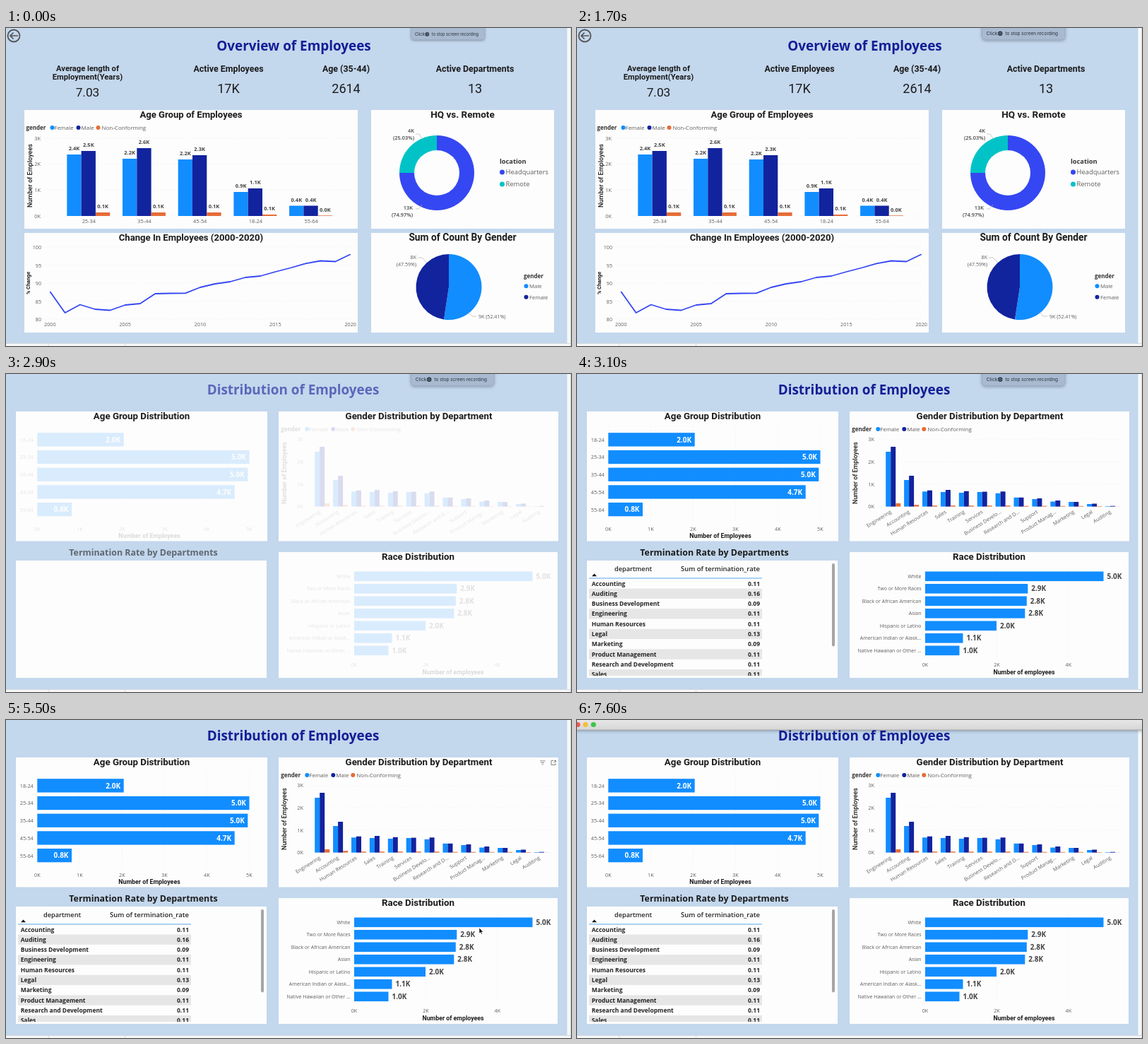
An HTML page for the animation above (7.7 s loop, 800 by 450 pixels).

```html
<!DOCTYPE html>
<html lang="en">
<head>
<meta charset="utf-8">
<title>Employee dashboard</title>
<style>
  html, body { margin: 0; width: 100%; height: 100%; overflow: hidden; background: #c3d7ed; }
  svg { display: block; width: 800px; height: 450px; }
  text { font-family: "Open Sans", "Noto Sans", sans-serif; }
  .din { font-family: Roboto, sans-serif; }
  .ui { font-family: Inter, sans-serif; }
</style>
</head>
<body>
<svg id="stage" viewBox="0 0 800 450"></svg>
<script>
const LOOP = 7700;
const FEMALE = '#118dff', MALE = '#12239e', OTHER = '#e66c37', BLUE = '#3547f2', TEAL = '#01c3c7';
const INK = '#1c1c1c', GREY = '#605e5c';

// Drawing helpers; each returns SVG markup.
const rect = (x, y, w, h, fill, extra = '') =>
  `<rect x="${x}" y="${y}" width="${w}" height="${h}" fill="${fill}" ${extra}/>`;
const dot = (x, y, r, fill, extra = '') => `<circle cx="${x}" cy="${y}" r="${r}" fill="${fill}" ${extra}/>`;
const path = (d, stroke, width = 1, extra = '') =>
  `<path d="${d}" fill="none" stroke="${stroke}" stroke-width="${width}" ${extra}/>`;
const text = (s, x, y, size, { anchor = 'start', weight = 400, fill = GREY, cls = '', turn = 0 } = {}) =>
  `<text x="${x}" y="${y}" font-size="${size}" font-weight="${weight}" fill="${fill}" text-anchor="${anchor}"
    class="${cls}" ${turn ? `transform="rotate(${turn} ${x} ${y})"` : ''}>${s}</text>`;
const end = { anchor: 'end' }, mid = { anchor: 'middle' };
const heading = (s, x, y, size = 13.3, weight = 700, turn = 0) =>
  text(s, x, y, size, { anchor: 'middle', weight, fill: INK, cls: 'din', turn });
const title = (s, x, y) => text(s, x, y, 18.9, { anchor: 'middle', weight: 700, fill: '#141e96' });
const panel = (x, y, right, bottom) => rect(x, y, right - x, bottom - y, '#fdfdfd');
const grid = d => path(d, '#dedede', .6, 'stroke-dasharray="1 3"');
const each = (list, fn) => list.map(fn).join('');
const group = (id, content, extra = '') => `<g id="${id}" ${extra}>${content}</g>`;

function genderLegend(x, y) {
  return text('gender', x, y, 8, { weight: 700, fill: '#333' }) +
    each([['Female', 37, 40, FEMALE], ['Male', 74, 78, MALE], ['Non-Conforming', 102, 107, OTHER]],
      ([name, cx, tx, fill]) => dot(x + cx, y - 3, 3, fill) + text(name, x + tx, y, 8));
}

function sector(cx, cy, r, from, to, fill) {
  const at = part => {
    const a = part * 2 * Math.PI;
    return `${cx + r * Math.sin(a)} ${cy - r * Math.cos(a)}`;
  };
  return `<path d="M${cx} ${cy}L${at(from)}A${r} ${r} 0 ${to - from > .5 ? 1 : 0} 1 ${at(to)}Z" fill="${fill}"/>`;
}

function ageColumns() {
  const base = 266;
  const groups = [
    ['25-34', [179, 174, 261], ['2.4K', '2.5K', '0.1K']],
    ['35-44', [185, 170, 261], ['2.2K', '2.6K', '0.1K']],
    ['45-54', [186, 180, 261], ['2.2K', '2.3K', '0.1K']],
    ['18-24', [232, 227, 264], ['0.9K', '1.1K', '0.1K']],
    ['55-64', [251.5, 251.5, 265.3], ['0.4K', '0.4K', '0.0K']]];
  return each([0, 1, 2, 3], k => {
    const y = base - 36.7 * k;
    return grid(`M55 ${y}H490`) + text(k + 'K', 49, y + 2.6, 7.3, end);
  }) + each(groups, ([name, tops, labels], i) => {
    const x = 86.3 + 78.7 * i;
    return each(tops, (top, j) =>
      rect(x + 20.3 * j, top, 20.3, base - top, [FEMALE, MALE, OTHER][j]) +
      text(labels[j], x + 10.2 + 20.3 * j, top - 5.7, 7.5, { anchor: 'middle', weight: 700, fill: '#444' })) +
      text(name, x + 31, 275.7, 7.4, mid);
  }) + heading('Number of Employees', 37, 209, 9.1, 500, -90);
}

function changeLine() {
  const ys = [373, 403, 391.5, 398, 399.5, 392, 390, 376, 375.5, 375.3, 367, 362, 359, 353, 351,
    345, 339.5, 333.3, 329.5, 330.5, 320.3];
  const x = i => 62.3 + 21.27 * i;
  return each([80, 85, 90, 95, 100], v => {
    const y = 412 - (v - 80) * 5.1;
    return grid(`M55 ${y}H490`) + text(v, 50, y + 3, 7.2, end);
  }) + each([0, 5, 10, 15, 20], i => text(2000 + i, x(i), 422.3, 7.2, mid)) +
    path('M' + ys.map((y, i) => `${x(i)} ${y}`).join('L'), BLUE, 1.8, 'stroke-linejoin="round"') +
    heading('% Change', 34, 361, 7.3, 700, -90);
}

function donut() {
  const label = { anchor: 'end', weight: 600, fill: '#444' };
  return sector(610, 205, 53, 0, .7497, BLUE) + sector(610, 205, 53, .7497, 1, TEAL) + dot(610, 205, 32, '#fdfdfd') +
    path('M580 150H585L590 158M580 256H584L589 250', '#b5b5b5', .7) +
    text('4K', 578, 148.3, 7.4, label) + text('(25.03%)', 578, 158, 7.4, label) +
    text('13K', 576, 257.2, 7.4, label) + text('(74.97%)', 576, 267, 7.4, label) +
    text('location', 699, 192, 9.3, { weight: 700, fill: '#333' }) +
    dot(702.5, 204, 3.5, BLUE) + text('Headquarters', 707.5, 207.3, 9.4) +
    dot(702.5, 221, 3.5, TEAL) + text('Remote', 707.5, 224.3, 9.4);
}

function pie() {
  return sector(627, 366.5, 46.5, 0, .5241, FEMALE) + sector(627, 366.5, 46.5, .5241, 1, MALE) +
    path('M583 325H589L596 332M655 402L660 408H666', '#b5b5b5', .7) +
    text('8K', 581, 327, 7.1, end) + text('(47.59%)', 581, 336.7, 7.1, end) + text('9K (52.41%)', 669, 411, 7.1) +
    text('gender', 733, 354, 8, { weight: 700, fill: '#333' }) +
    dot(736.5, 365.3, 3, FEMALE) + text('Male', 741, 368.2, 7.8) +
    dot(736.5, 380.8, 3, MALE) + text('Female', 741, 383.7, 7.8);
}

function overview() {
  const kpis = [['Active Employees', '17K', 315], ['Age (35-44)', '2614', 481.5], ['Active Departments', '13', 664]];
  return path('M17 11H6M10.5 6.5L6 11L10.5 15.5', '#555', 1.7) + dot(11, 11, 8.5, 'none', 'stroke="#555" stroke-width="1.8"') +
    title('Overview of Employees', 407.5, 32.3) +
    heading('Average length of', 115.5, 61.3, 11.2) + heading('Employment(Years)', 115.5, 73.3, 11.2) +
    heading('7.03', 115.5, 96.5, 17.3, 400) +
    each(kpis, ([name, value, x]) => heading(name, x, 62.3, 12.4) + heading(value, x, 92, 18, 400)) +
    panel(26, 116, 498, 284) + panel(517, 116, 776, 284) + panel(26, 290, 498, 431) + panel(517, 290, 776, 431) +
    heading('Age Group of Employees', 262, 127, 13.1) + heading('HQ vs. Remote', 646.5, 127, 13.5) +
    heading('Change In Employees (2000-2020)', 262, 300.6, 13.1) + heading('Sum of Count By Gender', 646.5, 300.6, 13.8) +
    genderLegend(28.5, 144) + ageColumns() + changeLine() + donut() + pie();
}

function ageBars() {
  const rows = [['18-24', 166.7, '2.0K'], ['25-34', 344.5, '5.0K'], ['35-44', 342.3, '5.0K'],
    ['45-54', 323.7, '4.7K'], ['55-64', 93, '0.8K']];
  return each([0, 1, 2, 3, 4, 5], k =>
    grid(`M${44.3 + 60 * k} 75V208`) + text(k + 'K', 44.3 + 60 * k, 221.5, 7.3, mid)) +
    each(rows, ([name, right, label], i) => {
      const y = 83.2 + 24.7 * i;
      return rect(44.3, y, right - 44.3, 19.3, FEMALE) + text(name, 38.8, y + 12.5, 7.3, end) +
        text(label, right - 4.5, y + 13.4, 10, { anchor: 'end', weight: 700, fill: '#fff' });
    }) + heading('Number of Employees', 203, 231.7, 8.8);
}

function departmentColumns() {
  const base = 187.6;
  const departments = [['Engineering', 110, 103, 183], ['Accounting', 150, 144, 185.2],
    ['Human Resources', 166.3, 164.7, 186.2], ['Sales', 167, 164, 186.2], ['Training', 168, 165.8, 186.2],
    ['Services', 167, 166.6, 186.2], ['Business Develo...', 168.8, 166.3, 186.2], ['Research and D...', 174.8, 174.8, 186.7],
    ['Support', 177, 176, 186.7], ['Product Manag...', 180.5, 179, 186.8], ['Marketing', 181, 181, 186.8],
    ['Legal', 184, 183.5, 187], ['Auditing', 187, 186.7, 187.5]];
  return each([0, 1, 2, 3], k => {
    const y = base - 31.6 * k;
    return grid(`M427 ${y}H775`) + text(k + 'K', 421, y + 2.6, 7.3, end);
  }) + each(departments, ([name, ...tops], i) => {
    const x = 437.2 + 25.9 * i;
    return each(tops, (top, j) => rect(x + 7 * j, top, 7, base - top, [FEMALE, MALE, OTHER][j])) +
      text(name, x + 8.5, 196.5, 7.2, { anchor: 'end', turn: -32 });
  }) + heading('Number of Employees', 397.3, 140, 8.9, 500, -90);
}

function raceBars() {
  const rows = [['White', 745.5, '5.0K'], ['Two or More Races', 638.3, '2.9K'], ['Black or African American', 636.8, '2.8K'],
    ['Asian', 634.3, '2.8K'], ['Hispanic or Latino', 594, '2.0K'], ['American Indian or Alask...', 546.5, '1.1K'],
    ['Native Hawaiian or Other ...', 541.5, '1.0K']];
  return each([0, 2, 4], k =>
    grid(`M${493 + 50.7 * k} 275V402`) + text(k + 'K', 493 + 50.7 * k, 414.3, 7.2, mid)) +
    each(rows, ([name, right, label], i) => {
      const y = 286.3 + 17.5 * i;
      return rect(493, y - 6.8, right - 493, 13.6, FEMALE) + text(name, 487.5, y + 2.6, 7, end) +
        text(label, right + 5, y + 3.6, 10, { weight: 700, fill: '#444' });
    }) + heading('Number of employees', 633, 425, 8.8);
}

function terminationTable() {
  const rows = [['Accounting', .11], ['Auditing', .16], ['Business Development', .09], ['Engineering', .11],
    ['Human Resources', .11], ['Legal', .13], ['Marketing', .09], ['Product Management', .11],
    ['Research and Development', .11], ['Sales', .11]];
  const bold = { weight: 700, fill: '#252423' };
  return text('department', 79.5, 279, 9.2, { anchor: 'middle', weight: 600, fill: '#252423' }) +
    text('Sum of termination_rate', 259, 279, 9.5, { anchor: 'end', weight: 600, fill: '#252423' }) +
    `<path d="M21 286.3L24.5 282.6L28 286.3Z" fill="#111"/>` +
    `<clipPath id="rows"><rect x="14" y="264" width="300" height="163"/></clipPath><g clip-path="url(#rows)">` +
    each(rows, ([name, rate], i) => {
      const y = 296.4 + 14.3 * i;
      return (i % 2 ? rect(17, y - 7.1, 245, 14.3, '#e6e6e6') : '') +
        text(name, 20.7, y + 3.1, 8.5, bold) + text(rate.toFixed(2), 259, y + 3.1, 8.5, { ...bold, anchor: 'end' });
    }) + '</g>' + path('M17 289H262', '#5aa5ee', 1) + rect(361, 268, 4, 117.5, '#a6a6a6', 'rx="2"');
}

function distribution() {
  return panel(14, 53, 370, 236.5) + panel(386, 53, 782, 236.5) + panel(14, 264, 369, 430) + panel(386, 252, 781, 430) +
    group('titles', title('Distribution of Employees', 406.5, 29.2) +
      text('Termination Rate by Departments', 194.5, 256.7, 12.4, { anchor: 'middle', weight: 700, fill: INK })) +
    heading('Age Group Distribution', 192, 64.2) + heading('Gender Distribution by Department', 584.5, 64.2) +
    heading('Race Distribution', 583.5, 263) +
    group('charts', genderLegend(389.3, 81) + ageBars() + departmentColumns() + raceBars()) +
    group('table', terminationTable()) +
    group('icons', path('M756 58H763.5M757.5 60.5H762M758.8 63H760.7', '#777', .9) +
      path('M775 57.5H772V63.5H778V61M775.5 60.5L778.3 57.6M776 57.4H778.5V60', '#777', .9));
}

const toast = rect(573.5, -8, 117.5, 24.3, '#a9bad0', 'rx="4.5" stroke="#92a5bd" stroke-width=".7" filter="url(#shadow)"') +
  text('Click', 579.7, 10.2, 6.8, { cls: 'ui', fill: '#26313f' }) +
  dot(599.2, 7.8, 2.5, '#a9bad0', 'stroke="#26313f" stroke-width="1.4"') + dot(599.2, 7.8, 1.2, '#26313f') +
  text('to stop screen recording', 606.5, 10.2, 6.45, { cls: 'ui', fill: '#26313f' });

const titleBar = rect(-5, -5, 810, 19, 'url(#metal)', 'filter="url(#shadow)"') + path('M0 14H800', '#a9a9a9', .8) +
  dot(1, 6.5, 3.6, '#f5544d') + dot(12, 6.5, 3.6, '#f6bd3b') + dot(23.3, 6.5, 3.6, '#3fc34a');

document.getElementById('stage').innerHTML =
  `<defs><filter id="shadow" x="-10%" y="-50%" width="120%" height="250%">
    <feDropShadow dx="0" dy="1.5" stdDeviation="2" flood-opacity=".3"/></filter>
  <linearGradient id="metal" x2="0" y2="1"><stop offset="0" stop-color="#ececec"/><stop offset="1" stop-color="#d6d6d6"/></linearGradient></defs>` +
  rect(0, 0, 800, 450, '#f6f7f8') + rect(0, 0, 794.5, 446, '#c3d7ed') +
  path('M0 446.5H800M60 446V450M168.5 446V450M799.5 0V450', '#cfd3d8', .8) +
  group('overview', overview()) + group('distribution', distribution()) + group('toast', toast) + group('bar', titleBar) +
  group('cursor', '<path d="M0 0V8.2L1.9 6.5L3.1 9.2L4.4 8.6L3.2 6H5.7Z" fill="#111" stroke="#fff" stroke-width=".6"/>');

const set = (id, name, value) => document.getElementById(id).setAttribute(name, value);
const show = (id, on) => set(id, 'visibility', on ? 'inherit' : 'hidden');
const ramp = (t, from, to) => Math.min(1, Math.max(0, (t - from) / (to - from)));
const ease = p => p * p * (3 - 2 * p);

// Cursor stops as [time, x, y].
const cursorStops = [[5300, 650, 428], [5700, 690, 160], [6100, 650, 80], [6500, 606, 22], [6600, 606, 22], [6900, 598, -12]];
function cursorAt(t) {
  const next = Math.max(1, cursorStops.findIndex(stop => stop[0] >= t));
  const [t0, x0, y0] = cursorStops[next - 1], [t1, x1, y1] = cursorStops[next];
  const p = ease(ramp(t, t0, t1));
  return [x0 + (x1 - x0) * p, y0 + (y1 - y0) * p];
}

function draw(now) {
  const t = Math.floor(now % LOOP / 100) * 100;
  const second = t >= 2800;
  set('overview', 'display', second ? 'none' : 'inline');
  set('distribution', 'display', second ? 'inline' : 'none');
  set('titles', 'opacity', ramp(t, 2700, 3035));
  set('charts', 'opacity', ramp(t, 2870, 3070));
  show('table', t >= 3000);
  show('icons', t >= 5500 && t < 6800);

  const grow = ease(ramp(t, 0, 400));
  const lift = -26 * ease(ramp(t, 5200, 5600));
  set('toast', 'transform', `translate(573 ${1.9 * (1 - grow) + lift}) scale(${.89 + .11 * grow}) translate(-573 0)`);
  show('toast', t < 5600);
  set('bar', 'transform', `translate(0 ${-24 * (1 - ease(ramp(t, 6700, 7100)))})`);
  show('bar', t > 6700);
  const moving = t >= 5300 && t < 6900;
  show('cursor', moving);
  if (moving) set('cursor', 'transform', `translate(${cursorAt(t)})`);
  requestAnimationFrame(() => draw(performance.now()));
}
draw(performance.now());
</script>
</body>
</html>
```
